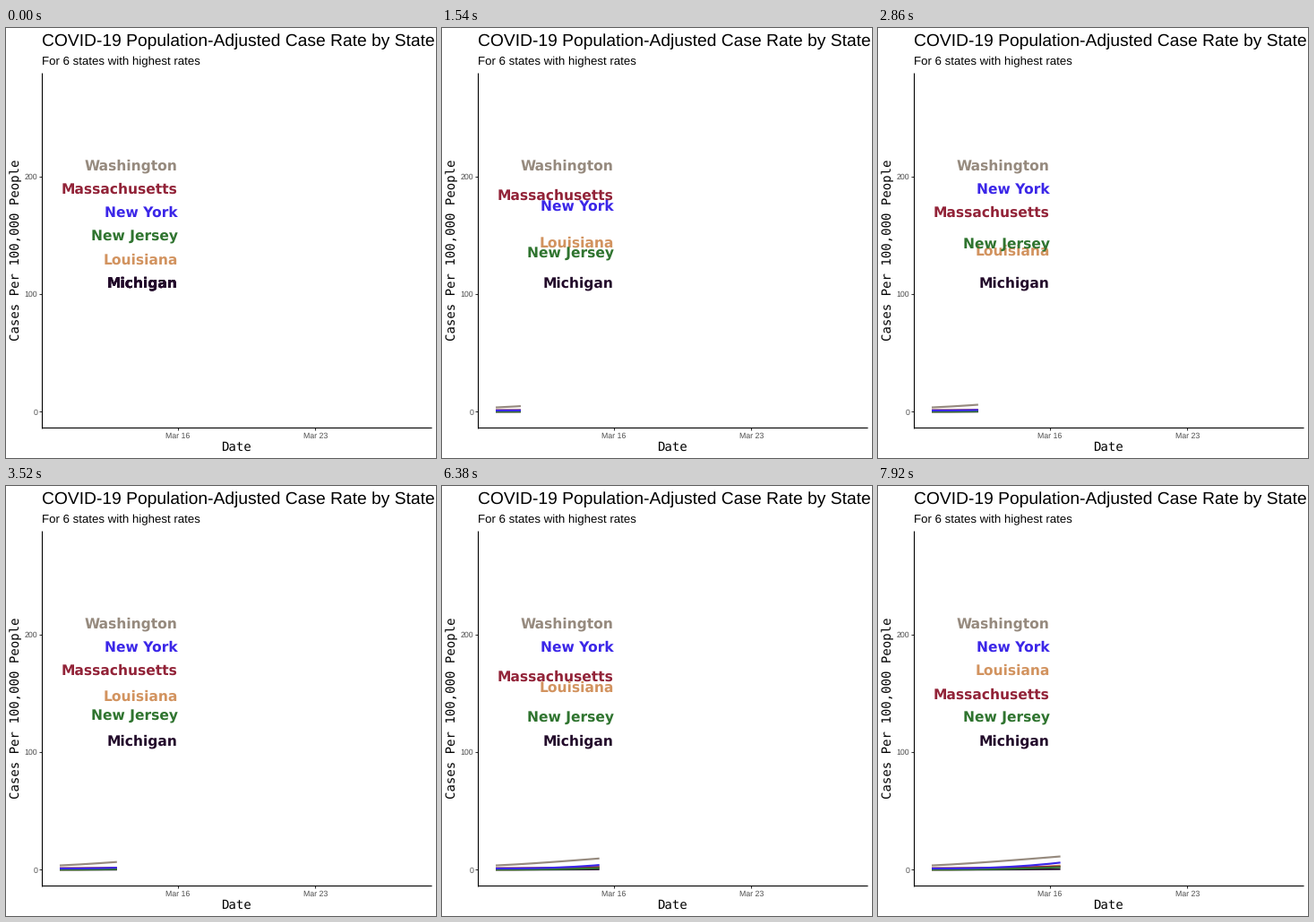
A matplotlib script for the animation above (8000 ms loop, 480 by 480 pixels).

```python
import matplotlib.pyplot as plt
import numpy as np
from matplotlib.animation import FuncAnimation

plt.rcParams["text.hinting"] = "none"

SIZE, DPI = 480, 100
PT = 72 / DPI            # points per pixel
LOOP, INTERVAL = 8000, 50
STEP, STEPS_PER_DAY = 110, 11
FIRST_X, DAY_W = 60, 21.94
ZERO_Y, UNIT_H = 428.3, 1.3135
LABEL_X = 191.5
DAYS = np.arange(8)

# rate(day) = base + gain * day ** power, back to front
STATES = {
    "Louisiana": ("#d2935f", 0.1, 0.06, 2.15),
    "Massachusetts": ("#922338", 1.3, 0.04, 1.9),
    "Michigan": ("#230b2b", 0, 0.012, 2),
    "New Jersey": ("#2f742f", 0.1, 0.025, 2.35),
    "New York": ("#3b26e8", 1.0, 0.05, 2.45),
    "Washington": ("#968a7e", 3.6, 0.85, 1.17),
}
FIRST_ORDER = ["Washington", "Massachusetts", "New York",
               "New Jersey", "Louisiana", "Michigan"]
# (day, place): the state in this place trades with the one below
SWAPS = [(0, 3), (1, 1), (1, 3), (2, 3), (5, 2)]


def order_on(day):
    order = FIRST_ORDER.copy()
    for start, place in SWAPS:
        if start < day:
            order[place], order[place + 1] = order[place + 1], order[place]
    return order


def x_at(day):
    return FIRST_X + DAY_W * np.asarray(day)


def y_at(value):
    return ZERO_Y - UNIT_H * np.asarray(value)


fig = plt.figure(figsize=(SIZE / DPI, SIZE / DPI), dpi=DPI, facecolor="white")
ax = fig.add_axes([0, 0, 1, 1])
ax.set(xlim=(0, SIZE), ylim=(SIZE, 0))
ax.axis("off")


def write(x, y, text, size, font="Liberation Sans", **kw):
    return ax.text(x, y, text, fontsize=size * PT, family=font,
                   **{"va": "baseline", **kw})


def write_label(name, y, z):
    return write(LABEL_X, y, name, 15.5, "DejaVu Sans", weight="bold",
                 ha="right", color=STATES[name][0], zorder=z)


def stroke(xs, ys, color="black", width=1.1, **kw):
    return ax.plot(xs, ys, color=color, lw=width * PT,
                   solid_capstyle="butt", **kw)[0]


write(40, 20, "COVID-19 Population-Adjusted Case Rate by State", 19.3)
write(40, 41, "For 6 states with highest rates", 13.27)
write(257, 472, "Date", 14, "DejaVu Sans Mono", ha="center")
write(18, 247.5, "Cases Per 100,000 People", 14, "DejaVu Sans Mono",
      ha="right", va="center", rotation=90)

for value in (0, 100, 200):
    y = y_at(value)
    stroke([37.3, 40], [y, y], "#333333")
    write(35.3, y + 3.4, str(value), 8.8, ha="right", color="#4d4d4d")
for day, text in ((6, "Mar 16"), (13, "Mar 23")):
    x = x_at(day)
    stroke([x, x], [446.3, 449], "#333333")
    write(x, 458, text, 8.8, ha="center", color="#4d4d4d")
stroke([40.3, 40.3], [49.5, 446.8])
stroke([39.8, 474.5], [446.3, 446.3])

lines, labels, rates, places = {}, {}, {}, {}
for z, (name, (color, base, gain, power)) in enumerate(STATES.items()):
    lines[name] = stroke([], [], color, 2.15, zorder=3 + z, snap=False)
    labels[name] = write_label(name, 0, 20 + z)
    rates[name] = base + gain * DAYS ** float(power)
    places[name] = [order_on(day).index(name) for day in DAYS]

# several states share the last place on the first day
heavy = [write_label("Michigan", y_at(110) + 6, 22) for _ in range(3)]


def update(i):
    step = (i * INTERVAL + 40) // STEP
    day = step / STEPS_PER_DAY
    past = np.append(DAYS[DAYS < day], day)
    for name, line in lines.items():
        line.set_data(x_at(past), y_at(np.interp(past, DAYS, rates[name])))
        line.set_visible(step > 0)
        place = np.interp(day, DAYS, places[name])
        labels[name].set_y(y_at(210 - 20 * place) + 6)
    for extra in heavy:
        extra.set_visible(step < STEPS_PER_DAY)
    return [*lines.values(), *labels.values(), *heavy]


anim = FuncAnimation(fig, update, frames=LOOP // INTERVAL, interval=INTERVAL,
                     repeat=True, repeat_delay=0, blit=False)
plt.show()
```
